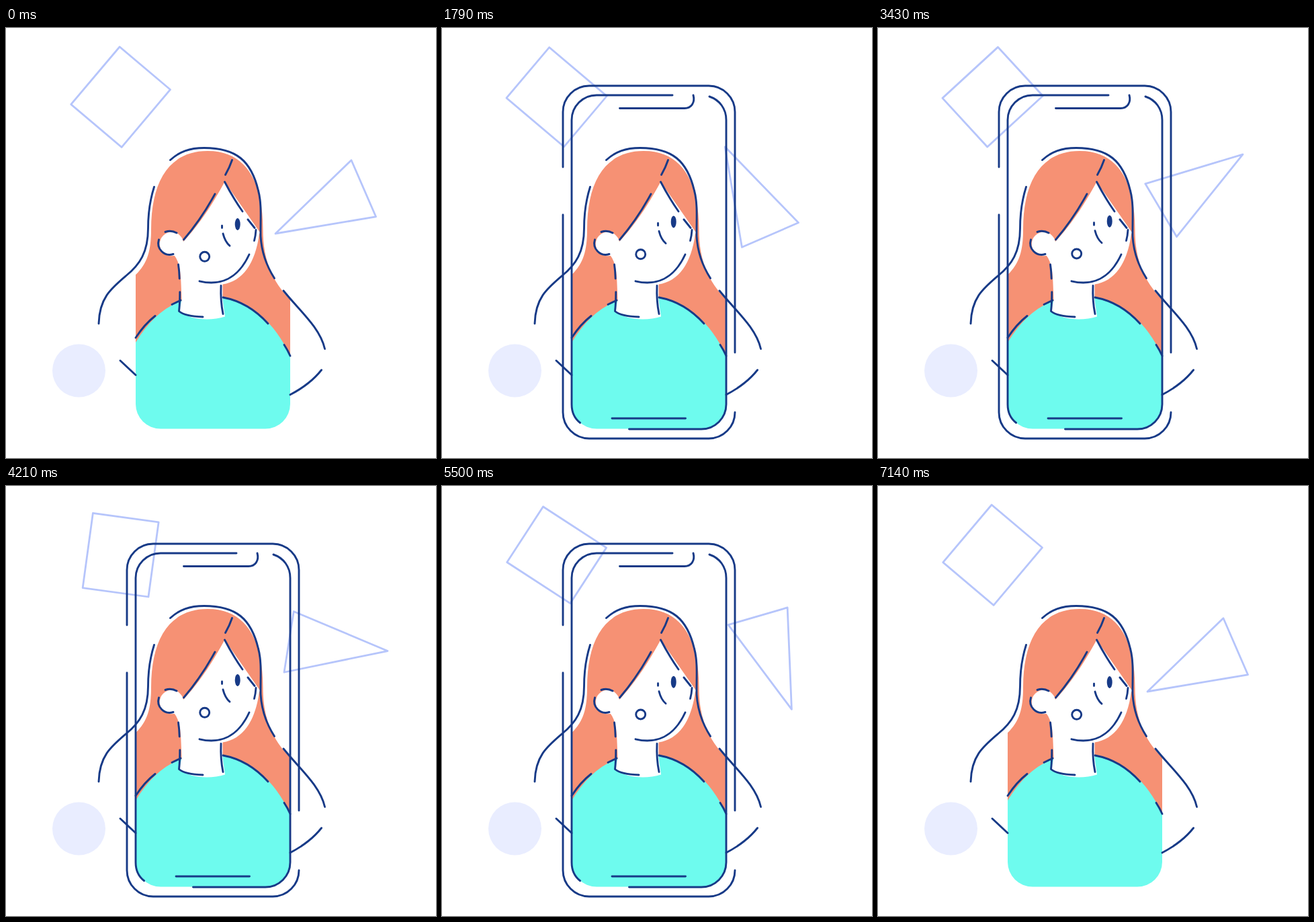
These frames come from a looping animation (640x640 px, 7210 ms). An HTML page:

```html
<!DOCTYPE html>
<html lang="en">
<head>
<meta charset="utf-8">
<title>Video call</title>
<style>
  html, body { margin: 0; width: 100%; height: 100%; overflow: hidden; background: #fff; }
  svg { display: block; width: 100vw; height: 100vh; }
  .line { fill: none; stroke: #173a87; stroke-width: 2.9; stroke-linecap: round; stroke-linejoin: round; }
  .deco { fill: none; stroke: #b6c5fb; stroke-width: 2.8; stroke-linejoin: round; }
  .hair { fill: #f69174; }
  .skin { fill: #fff; }
  .top { fill: #6efbee; }
</style>
</head>
<body>
<svg viewBox="0 0 640 640">
  <defs>
    <clipPath id="screen"><rect x="193" y="100" width="230" height="496.5" rx="37"/></clipPath>
  </defs>

  <circle cx="108.5" cy="510" r="39.5" fill="#e9edff"/>
  <rect id="square" class="deco" x="121.3" y="46.6" width="98.7" height="112.2"/>
  <path id="triangle" class="deco" d="M401 306 L514 196.7 L550.5 280.8 Z"/>

  <g clip-path="url(#screen)">
    <path class="hair" d="M180 378 C208 358 216 338 216 300 C216 225 245 183 300 183
      C360 183 382 232 382.5 300 C382.5 345 396 377 423 404 L424 500 H193 Z"/>
    <path class="top" d="M193 468 C212 437 234 416 262 406 L323 401
      C365 409 399 437 423 488 V597 H193 Z"/>
  </g>
  <path class="skin" d="M325.5 229 C309 259 290 290 264 318 L250 338 C257 346 260 360 260.5 380 L261.5 405
    L257.5 422 C275 435 305 436 326 429.500 L322.500 405 V381.500
    C352 377 371 351 377 306 L378.500 305 Z"/>
  <circle class="skin" cx="246.500" cy="321.500" r="17.800"/>

  <g class="line">
    <path d="M244.500 196.500 C258 184 273 178.500 295 178.500 C343 178.500 365 198 375.500 242
      C381 262 378.500 285 379 310 C380.500 337 389 356 399.500 372.500"/>
    <path d="M220.500 236.500 C214 257 211.500 278 211.500 298 C211.500 334 199 352 179 368.500 C156 388 139 402 138 440"/>
    <path d="M336.500 196.500 Q333 207 326.500 218.500"/>
    <path d="M325.500 229 Q338 253 352 273 M360 285 L370 297.500"/>
    <path d="M311 247 Q291 284 264.500 315"/>
    <path d="M372 300.500 Q371.500 309 369.500 316.500"/>
    <path d="M237 303.500 Q246 300.500 254 305 M227.500 315 C223.500 328 235 341 249 336.500"/>
    <path d="M288 376.800 C318 384 345 374 362 337"/>
    <path d="M256.500 352 Q258 362 258.200 373 M258.800 393 Q258.800 410 257.500 421.500 Q266 429 293 430"/>
    <path d="M320 383.500 Q319 406 323 425.500"/>
    <path d="M193 461 Q206 441 222 428.500 M247 411.500 L260 405.300"/>
    <path d="M323 401 Q361 408 390 440 M414 471.500 Q419 479 423 488"/>
    <path d="M413 391 C436 420 467 445 474.500 477.500"/>
    <path d="M469.500 509 Q453 530 423 545.800 M170 495 L193 516.500"/>
  </g>

  <g id="face">
    <ellipse cx="344.700" cy="289.900" rx="4" ry="9" fill="#173a87"/>
    <path class="line" d="M321.500 292 V295.500 M323 304 Q326 316 333 322"/>
    <circle class="line" cx="295.700" cy="338.200" r="7"/>
  </g>

  <g id="phone" class="line">
    <path d="M180 207 V125 A39 39 0 0 1 219 86 H397 A39 39 0 0 1 436 125 V483"/>
    <path d="M436 572 A39 39 0 0 1 397 611 H219 A39 39 0 0 1 180 572 V278"/>
    <path d="M205.500 587.500 C197 581 193 572 193 560 V137 A37 37 0 0 1 230 100 H343"/>
    <path d="M398 102 C413 107 423 120 423 137 V560 A37 37 0 0 1 386 597 H278.500"/>
    <path d="M374 100 C377 111 371 119.500 361 119.500 H264.500"/>
    <path d="M253 581 H362.500"/>
  </g>
</svg>
<script>
  const LOOP = 7210, STEP = 71.4, STEPS = 100;
  const byId = id => document.getElementById(id);
  const [square, triangle, face, phone] = ['square', 'triangle', 'face', 'phone'].map(byId);
  const strokes = [...phone.children];
  strokes.forEach(s => s.setAttribute('pathLength', 1));

  // Smooth ramp from 0 to 1 between two points of the loop
  function ramp(p, from, to) {
    const x = Math.min(1, Math.max(0, (p - from) / (to - from)));
    return x * x * (3 - 2 * x);
  }

  function spin(el, deg, x, y) {
    el.setAttribute('transform', `rotate(${deg} ${x} ${y})`);
  }

  function trim(start, end) {
    const len = end - start;
    phone.setAttribute('visibility', len > 0 ? 'visible' : 'hidden');
    for (const s of strokes) {
      s.setAttribute('stroke-dasharray', `${len} 2`);
      s.setAttribute('stroke-dashoffset', -start);
    }
  }

  function draw(ms) {
    // The picture advances in equal steps, about 14 per second
    const p = Math.min(STEPS, Math.floor((ms % LOOP + 5) / STEP)) / STEPS;
    spin(square, 40.2 - 360 * p, 170.65, 102.7);
    spin(triangle, 360 * p, 475.7, 251.5);
    const bob = 2.58 * Math.cos(2 * Math.PI * (p + 0.0985));
    face.setAttribute('transform', `translate(0 ${bob})`);
    trim(ramp(p, 0.78, 1), ramp(p, 0, 0.22));
  }

  const began = performance.now();
  function tick() {
    draw(performance.now() - began);
    requestAnimationFrame(tick);
  }
  tick();
</script>
</body>
</html>
```
